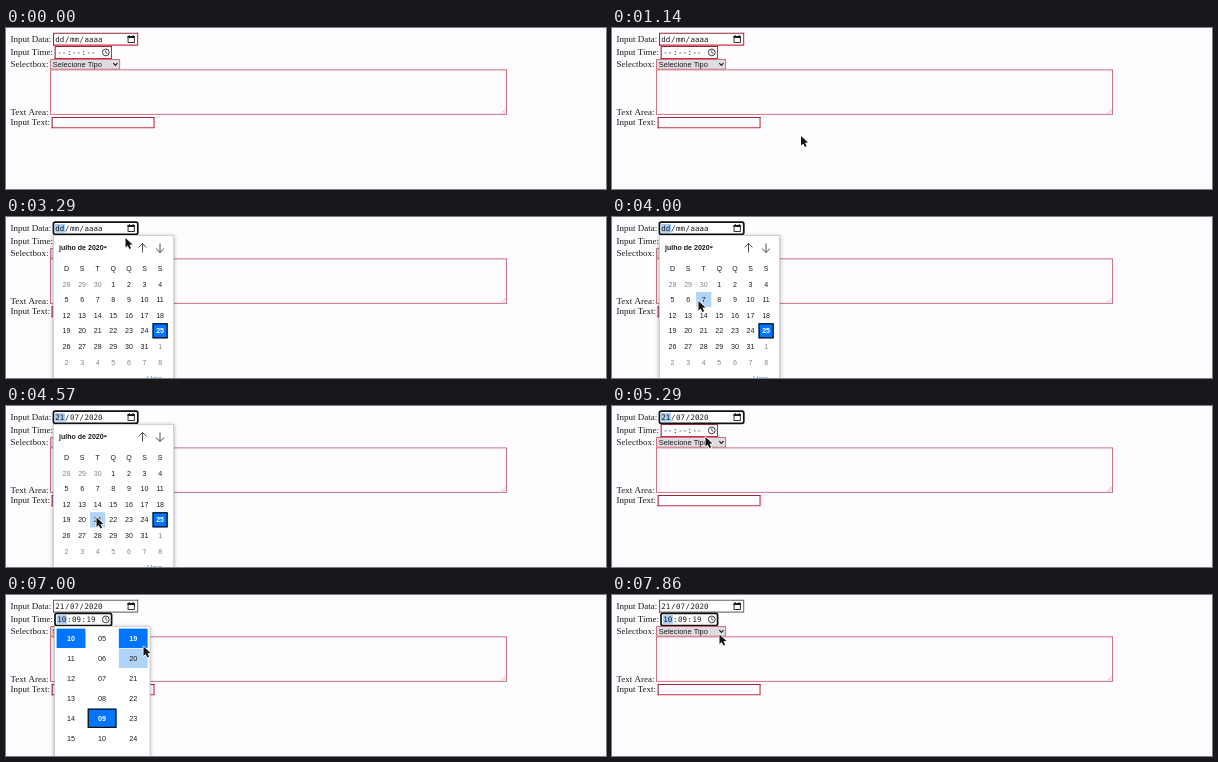
Animation, 600 px wide and 161 px high, one loop 8 s. Source, as an HTML page with a canvas:

```html
<!DOCTYPE html>
<html lang="pt">
<head>
<meta charset="utf-8">
<title>Form fields</title>
<style>
html, body { margin: 0; width: 100%; height: 100%; overflow: hidden; background: #fefcff; }
canvas { display: block; width: 600px; height: 161px; }
</style>
</head>
<body>
<canvas id="stage"></canvas>
<script>
const W = 600, H = 161, LOOP = 8000;
const canvas = document.getElementById('stage');
const c = canvas.getContext('2d');
const dpr = window.devicePixelRatio || 1;
canvas.width = W * dpr;
canvas.height = H * dpr;

const SERIF = '9px "Liberation Serif", serif';
const MONO = '7.47px "DejaVu Sans Mono", monospace';
const SANS = '"Liberation Sans", sans-serif';
const BG = '#fefcff', INK = '#1c1b1e', BLUE = '#0075ff', HOVER = '#b0d3f8';

// Steps at which the form changes state
const AT = { dateFocus: 22, dateOpen: 23, dateSet: 32, dateClose: 33,
             timeFocus: 38, timeOpen: 39, timeSet: 46, timeClose: 52 };

// Pointer path: step, x, y
const PATH = [
  [1, 11, 6], [3, 62, 34], [5, 128, 62], [8, 189, 108],
  [10, 120, 93], [12, 42, 60], [13, 42, 8], [16, 129, 61],
  [18, 204, 50], [20, 8, 12], [22, 122, 10], [24, 117, 32],
  [26, 98, 74], [28, 86.5, 84], [31, 90, 110], [33, 91, 113],
  [36, 94, 45], [37, 93.5, 31], [38, 98, 23], [40, 99, 42],
  [42, 93, 82], [43, 89.5, 91], [45, 93, 118], [46, 94, 120],
  [48, 130, 62], [49, 137.5, 51.5], [50, 136, 46], [52, 187, 52], [55, 107.5, 39.5]
];

function pointer(k) {
  const i = PATH.findIndex(p => p[0] >= k);
  const b = PATH[i], a = PATH[Math.max(0, i - 1)];
  const u = b === a ? 0 : (k - a[0]) / (b[0] - a[0]);
  return { x: a[1] + (b[1] - a[1]) * u, y: a[2] + (b[2] - a[2]) * u };
}

function text(s, x, y, font, color = INK, align = 'left') {
  c.font = font;
  c.fillStyle = color;
  c.textAlign = align;
  c.fillText(s, x, y);
}

function fill(x, y, w, h, color) {
  c.fillStyle = color;
  c.fillRect(x, y, w, h);
}

function line(points, color = INK, width = 1) {
  c.beginPath();
  points.forEach(([x, y]) => c.lineTo(x, y));
  c.strokeStyle = color;
  c.lineWidth = width;
  c.stroke();
}

function frame(x, y, w, h, color, width) {
  c.strokeStyle = color;
  c.lineWidth = width;
  c.strokeRect(x + width / 2, y + width / 2, w - width, h - width);
}

function inset(x, y, w, h, dark, light) {
  const r = x + w - .55, b = y + h - .55, l = x + .55, t = y + .55;
  fill(x, y, w, h, '#fff');
  line([[r, t - .55], [r, b], [l - .55, b]], light, 1.1);
  line([[l, b + .55], [l, t], [r + .55, t]], dark, 1.1);
}

function field(x, y, w, h, state) {
  if (state === 'focus') {
    fill(x, y, w, h, '#fff');
    c.beginPath();
    c.roundRect(x + .4, y + .4, w - .8, h - .8, 1.8);
    c.strokeStyle = '#101010';
    c.lineWidth = 1.7;
    c.stroke();
  } else if (state === 'valid') {
    inset(x, y, w, h, '#626166', '#77757b');
  } else {
    inset(x, y, w, h, '#9c2638', '#c92f43');
  }
}

function segments(parts, sep, x, y, selected) {
  const pitch = 4.5, pad = .56;
  parts.forEach((s, i) => {
    const w = s.length * pitch + pad * 2;
    if (i === 0 && selected) fill(x, y - 7, w, 8.6, '#a6cdf5');
    text(s, x + pad, y, MONO);
    x += w;
    if (i < 2) text(sep, x, y, MONO);
    x += pitch;
  });
}

function calendarIcon() {
  frame(121.6, 8, 7.2, 7, INK, .9);
  fill(121.6, 8, 7.2, 2, INK);
  fill(122.8, 7, 1, 1.5, INK);
  fill(126.6, 7, 1, 1.5, INK);
}

function clockIcon() {
  c.beginPath();
  c.arc(99.8, 24.4, 3.4, 0, Math.PI * 2);
  c.strokeStyle = INK;
  c.lineWidth = .85;
  c.stroke();
  line([[99.8, 22.2], [99.8, 24.6], [101.4, 25.6]], INK, .75);
}

function form(k) {
  text('Input Data:', 4.5, 14, SERIF);
  text('Input Time:', 4.5, 27, SERIF);
  text('Selectbox:', 4.5, 39, SERIF);
  text('Text Area:', 4.5, 87, SERIF);
  text('Input Text:', 4.5, 97, SERIF);

  const dateFocus = k >= AT.dateFocus && k < AT.timeFocus;
  const timeFocus = k >= AT.timeFocus;
  field(47, 4.7, 85.2, 13, dateFocus ? 'focus' : k >= AT.dateSet ? 'valid' : 'invalid');
  segments(k >= AT.dateSet ? ['21', '07', '2020'] : ['dd', 'mm', 'aaaa'], '/', 48.8, 14, dateFocus);
  calendarIcon();

  field(48.6, 18, 57.4, 13, timeFocus ? 'focus' : 'invalid');
  segments(k >= AT.timeSet ? ['10', '09', '19'] : ['--', '--', '--'], ':', 50.8, 27.2, timeFocus);
  clockIcon();

  fill(44.3, 31.3, 69.8, 10.2, '#dedce0');
  frame(44.3, 31.3, 69.8, 10.2, '#c04656', .7);
  text('Selecione Tipo', 46.8, 39, '7.47px ' + SANS);
  line([[107.3, 35.2], [109.4, 37.4], [111.5, 35.2]], INK, 1.1);

  fill(44, 41.5, 457, 45.2, BG);
  frame(44, 41.5, 457, 45.2, '#bf5060', .8);
  line([[495.4, 85.4], [499.6, 81.2]], '#88868c', .5);
  line([[497.7, 85.4], [499.6, 83.5]], '#88868c', .5);

  field(45.6, 89, 103, 11.3, 'invalid');
}

function panel(x, y, w) {
  c.save();
  c.shadowColor = 'rgba(0,0,0,.35)';
  c.shadowBlur = 4 * dpr;
  c.shadowOffsetY = dpr;
  fill(x, y, w, 170, '#fff');
  c.restore();
  frame(x, y, w, 170, '#b4b2b7', .6);
}

// Grid cell centred on x, y
function cell(s, x, y, w, h, size, look) {
  const l = x - w / 2, t = y - h / 2;
  if (look.hover) fill(l, t, w, h, HOVER);
  if (look.on) fill(l, t, w, h, BLUE);
  if (look.ring) frame(l, t, w, h, '#101010', 1.2);
  text(s, x, y + size * .36, (look.on ? 'bold ' : '') + size + 'px ' + SANS,
    look.on ? '#fff' : look.dim ? '#858388' : INK, 'center');
}

const inside = (p, x, y, w, h) => Math.abs(p.x - x) <= w / 2 && Math.abs(p.y - y) <= h / 2;

function arrow(x, y, dir) {
  line([[x, y - 4.5 * dir], [x, y + 4.5 * dir]], '#3a393c', .9);
  line([[x - 4, y + .6 * dir], [x, y + 4.5 * dir], [x + 4, y + .6 * dir]], '#3a393c', .9);
}

function datePanel(p) {
  const step = 15.6;
  panel(47, 18, 121);
  text('julho de 2020', 53, 32.8, 'bold 7.05px ' + SANS);
  c.beginPath();
  c.moveTo(97.3, 29.4);
  c.lineTo(101.3, 29.4);
  c.lineTo(99.3, 31.6);
  c.fill();
  arrow(136.5, 31, -1);
  arrow(154, 31, 1);
  [...'DSTQQSS'].forEach((d, i) => text(d, 60.5 + i * step, 53.5, '7px ' + SANS, INK, 'center'));
  for (let i = 0; i < 42; i++) {
    const n = i - 2, x = 60.5 + (i % 7) * step, y = 67 + Math.floor(i / 7) * step;
    const day = n < 1 ? n + 30 : n > 31 ? n - 31 : n;
    const today = n === 25;
    cell(day, x, y, 15.2, 15.2, 7.1, {
      on: today, ring: today, dim: n < 1 || n > 31, hover: inside(p, x, y, step, step)
    });
  }
  text('Hoje', 148.5, 164, '7.2px ' + SANS, '#2f7fe0', 'center');
}

function timePanel(p, set) {
  panel(48.3, 31, 96);
  [10, 5, 19].forEach((first, col) => {
    const x = 65 + col * 31.1;
    const chosen = col === 1 && set ? 4 : 0;
    for (let row = 0; row < 7; row++) {
      const y = 43.3 + row * 20;
      cell(String(first + row).padStart(2, '0'), x, y, 28.8, 19.4, 7.2, {
        on: row === chosen,
        ring: row === chosen && col === (set ? 1 : 0),
        hover: inside(p, x, y, 31, 20)
      });
    }
  });
}

function arrowCursor({ x, y }) {
  const shape = [[0, 0], [0, 9.4], [2.2, 7.4], [3.9, 11], [5.6, 10.2], [4, 6.8], [7, 6.6]];
  c.beginPath();
  shape.forEach(([dx, dy]) => c.lineTo(x + dx, y + dy));
  c.closePath();
  c.lineJoin = 'round';
  c.strokeStyle = '#fff';
  c.lineWidth = 1.6;
  c.stroke();
  c.fillStyle = '#151515';
  c.fill();
  c.lineJoin = 'miter';
}

function beamCursor({ x, y }) {
  for (const [color, width] of [['#fff', 2.6], ['#2a2a2c', 1.1]]) {
    line([[x - 2.2, y - 4], [x + 2.2, y - 4]], color, width);
    line([[x - 2.2, y + 4], [x + 2.2, y + 4]], color, width);
    line([[x, y - 4], [x, y + 4]], color, width + .2);
  }
}

function draw(k) {
  c.setTransform(dpr, 0, 0, dpr, 0, 0);
  fill(0, 0, W, H, BG);
  form(k);

  const dateOpen = k >= AT.dateOpen && k < AT.dateClose;
  const timeOpen = k >= AT.timeOpen && k < AT.timeClose;
  const before = pointer(Math.max(1, k - 1)); // hover trails the pointer by a step
  if (dateOpen) datePanel(before);
  if (timeOpen) timePanel(before, k >= AT.timeSet);

  if (k < 1) return;
  const p = pointer(k);
  const overText = inside(p, 272, 64, 456, 44) || inside(p, 97, 95, 102, 11);
  if (overText && !dateOpen && !timeOpen) beamCursor(p);
  else arrowCursor(p);
}

// Seven steps a second, each starting on a multiple of 10 ms
const startOf = k => Math.round(k * 100 / 7) * 10;

function stepAt(t) {
  let k = Math.min(55, Math.floor(t * 7 / 1000) + 1);
  while (startOf(k) > t) k--;
  return k;
}

const begin = performance.now();
function tick() {
  draw(stepAt((performance.now() - begin) % LOOP));
  requestAnimationFrame(tick);
}
tick();
</script>
</body>
</html>
```
